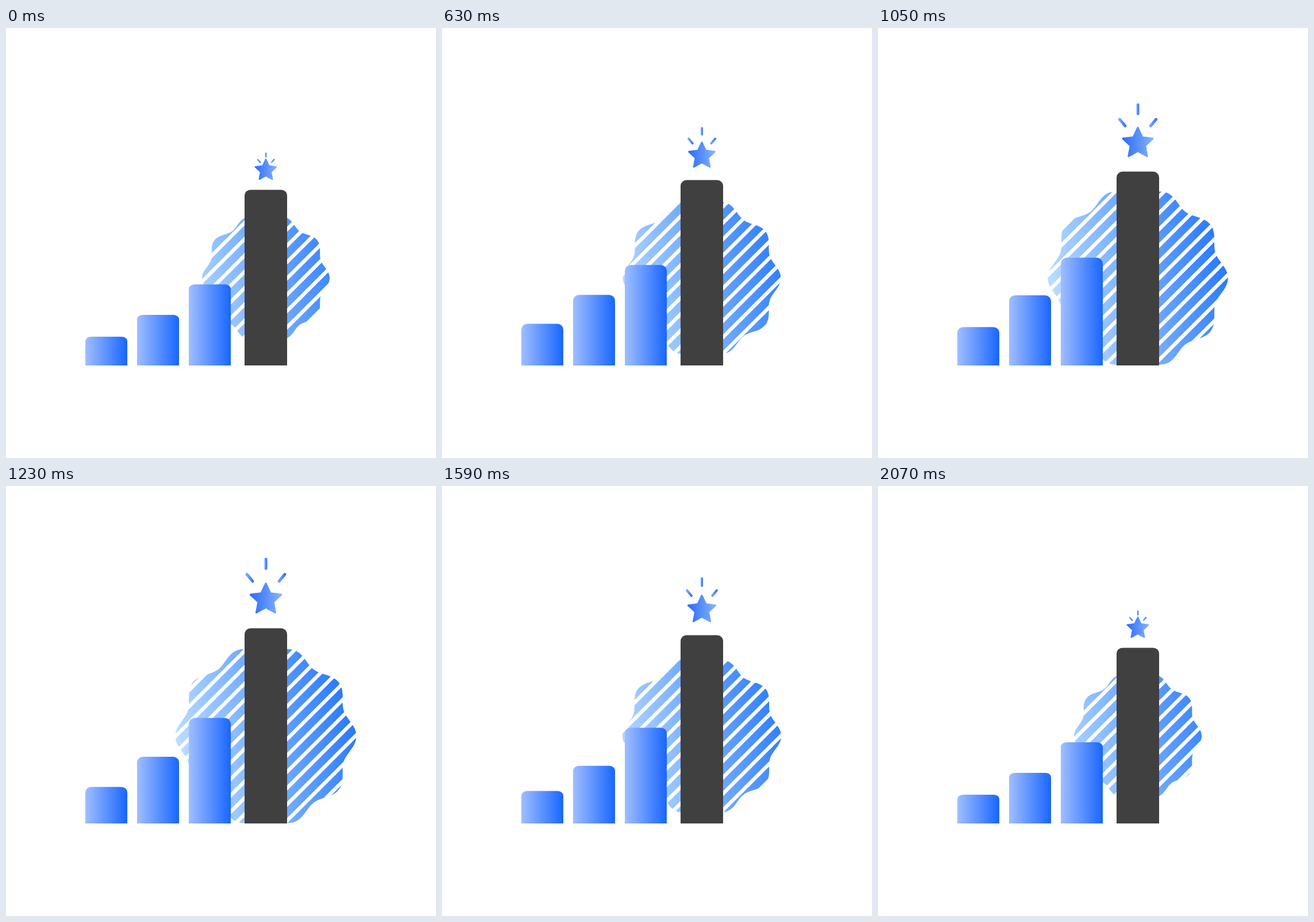
An HTML page with a canvas that plays this animation: 748x748 px, repeating every 2100 ms.

```html
<!DOCTYPE html>
<html lang="en">
<head>
<meta charset="utf-8">
<title>Growing bar chart</title>
<style>
html, body { margin: 0; width: 100%; height: 100%; overflow: hidden; background: #fff; }
canvas { display: block; width: 748px; height: 748px; }
</style>
</head>
<body>
<canvas id="stage" width="748" height="748"></canvas>
<script>
const ctx = document.getElementById('stage').getContext('2d');
const LOOP = 2100, STEP = 30, BASE = 587;
const CX = 452, CY = 435;

const mix = (a, b, p) => a + (b - a) * p;
const sine = x => (1 - Math.cos(Math.PI * x)) / 2;

// Cubic bezier easing with flat ends: handles (x1, 0) and (x2, 1)
const bezier = (x1, x2) => x => {
  let lo = 0, hi = 1;
  for (let i = 0; i < 24; i++) {
    const s = (lo + hi) / 2, r = 1 - s;
    if (3 * r * r * s * x1 + 3 * r * s * s * x2 + s * s * s < x) lo = s;
    else hi = s;
  }
  return lo * lo * (3 - 2 * lo);
};

// Rises to 1 at the peak time, then falls back to 0 at the end
function pulse(t, peak, rise = sine, fall = sine, end = LOOP) {
  if (t < peak) return rise(t / peak);
  return 1 - fall(Math.min(1, (t - peak) / (end - peak)));
}

const quickRise = bezier(0.167, 0.667);
const bars = [
  { x: 138, low: 537, high: 513.5, peak: 430, rise: quickRise, fall: bezier(0.333, 0.75) },
  { x: 228, low: 499, high: 461, peak: 775, rise: sine, fall: sine },
  { x: 318, low: 446, high: 399.5, peak: 1025, rise: quickRise, fall: bezier(0.333, 0.833) }
];

function gradient(x0, y0, x1, y1, from, to) {
  const g = ctx.createLinearGradient(x0, y0, x1, y1);
  g.addColorStop(0, from);
  g.addColorStop(1, to);
  return g;
}

// Corners flatten as the bar is scaled vertically
function drawBar(x, w, top, high, fill) {
  const rx = 10.5, ry = 10.5 * (BASE - top) / (BASE - high);
  ctx.beginPath();
  ctx.moveTo(x, BASE);
  ctx.lineTo(x, top + ry);
  ctx.ellipse(x + rx, top + ry, rx, ry, 0, Math.PI, Math.PI * 1.5);
  ctx.ellipse(x + w - rx, top + ry, rx, ry, 0, Math.PI * 1.5, Math.PI * 2);
  ctx.lineTo(x + w, BASE);
  ctx.closePath();
  ctx.fillStyle = fill;
  ctx.fill();
}

function drawBlob(t) {
  const size = mix(111, 158, pulse(t, 1170)) / 158;
  ctx.save();
  ctx.beginPath();
  for (let i = 0; i < 360; i++) {
    const a = i * Math.PI / 180;
    const r = size * (150.5 + 7.5 * Math.cos(10 * a));
    ctx.lineTo(CX + r * Math.cos(a), CY + r * Math.sin(a));
  }
  ctx.closePath();
  ctx.clip();

  // Diagonal bands x + y = const, scrolling two periods per loop
  const period = 28.4, gap = 9;
  const shift = 15.5 + 2 * period * t / LOOP;
  ctx.fillStyle = gradient(300, 480, 600, 390, '#bfe0ff', '#2878ff');
  for (let k = 18; k < 42; k++) {
    const a = k * period + shift + gap / 2;
    const b = a + period - gap;
    ctx.beginPath();
    ctx.moveTo(a - 250, 250);
    ctx.lineTo(b - 250, 250);
    ctx.lineTo(b - 620, 620);
    ctx.lineTo(a - 620, 620);
    ctx.closePath();
    ctx.fill();
  }
  ctx.restore();
}

function drawStar(p) {
  const r = mix(20.5, 29.5, p), cy = mix(247.5, 197.5, p);
  const round = r * 0.11;
  ctx.beginPath();
  for (let i = 0; i < 10; i++) {
    const a = i * Math.PI / 5 - Math.PI / 2;
    const d = i % 2 ? r * 0.46 : r - round / 2;
    ctx.lineTo(CX + d * Math.cos(a), cy + d * Math.sin(a));
  }
  ctx.closePath();
  ctx.fillStyle = ctx.strokeStyle = gradient(CX - r, cy, CX + r, cy, '#2868ff', '#8ab6ff');
  ctx.lineWidth = round;
  ctx.lineJoin = 'round';
  ctx.fill();
  ctx.stroke();
}

function drawRay(x0, y0, x1, y1, w) {
  const left = Math.min(x0, x1) - w / 2, right = Math.max(x0, x1) + w / 2;
  ctx.strokeStyle = gradient(left, 0, right, 0, '#82aeff', '#2a6eff');
  ctx.lineWidth = w;
  ctx.lineCap = 'round';
  ctx.beginPath();
  ctx.moveTo(x0, y0);
  ctx.lineTo(x1, y1);
  ctx.stroke();
}

function drawRays(p) {
  const q = p - 0.07 * p * (1 - p);
  const w = mix(2.6, 5, q);
  drawRay(CX, mix(218, 127, q), CX, mix(224, 143.5, q), w);
  for (const side of [-1, 1]) {
    drawRay(CX + side * mix(14, 33, q), mix(229, 153.5, q),
            CX + side * mix(10, 23, q), mix(233.5, 165.5, q), w);
  }
}

function draw(t) {
  ctx.fillStyle = '#fff';
  ctx.fillRect(0, 0, 748, 748);
  drawBlob(t);
  for (const b of bars) {
    const top = mix(b.low, b.high, pulse(t, b.peak, b.rise, b.fall));
    drawBar(b.x, 73, top, b.high, gradient(b.x, 0, b.x + 73, 0, '#a0beff', '#1866ff'));
  }
  const p = pulse(t, 1260, sine, sine, 2070);
  drawBar(415, 74, mix(281.5, 247.5, p), 247.5, '#404040');
  drawStar(p);
  drawRays(p);
}

const start = performance.now();
function tick() {
  const t = (performance.now() - start) % LOOP;
  draw(Math.floor(t / STEP) * STEP);
  requestAnimationFrame(tick);
}
tick();
</script>
</body>
</html>
```
